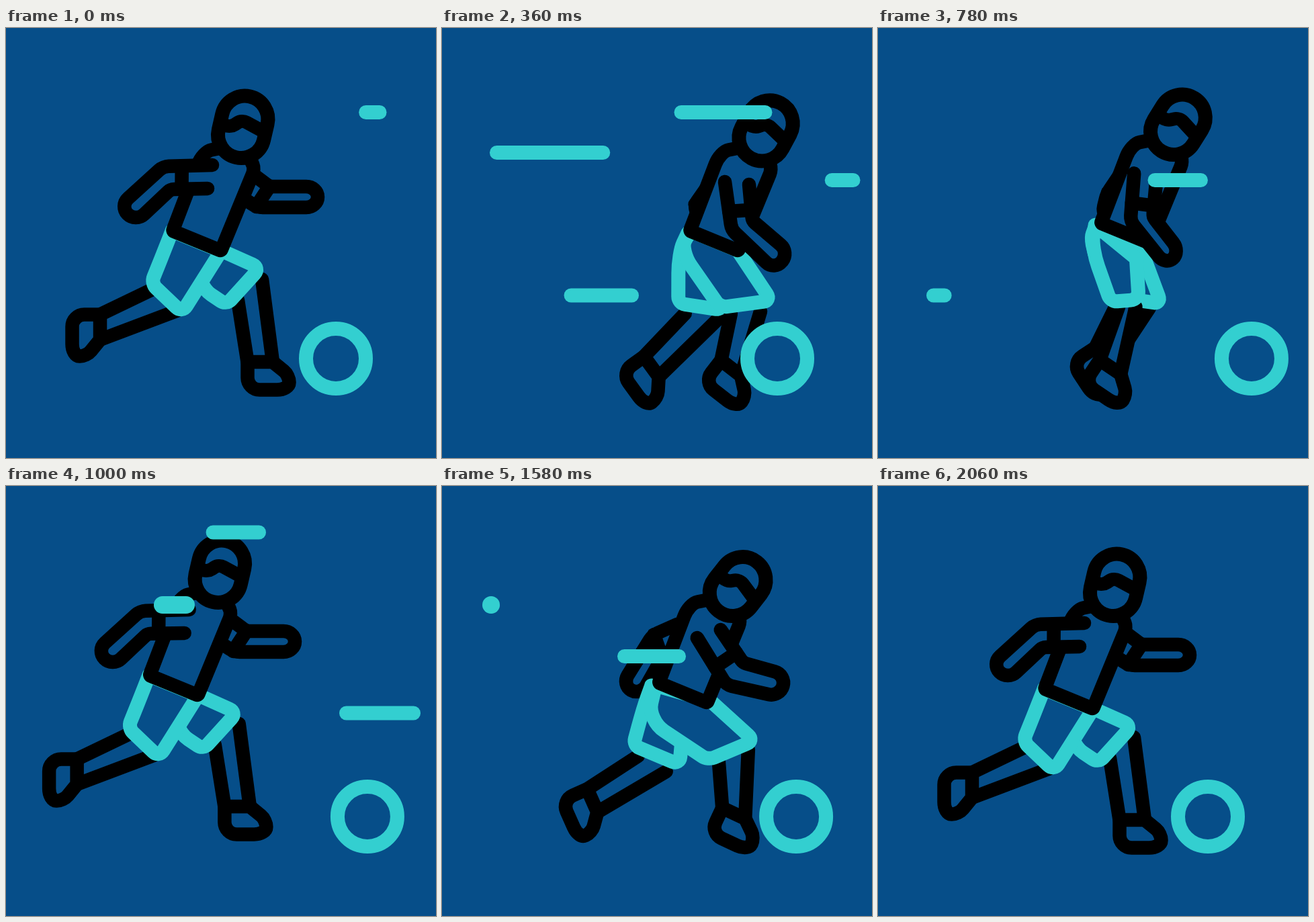
An HTML page with a canvas for the animation above (2400 ms loop, 640 by 640 pixels).

```html
<!DOCTYPE html>
<html lang="en">
<head>
<meta charset="utf-8">
<title>Running footballer</title>
<style>
  html, body { margin: 0; width: 100%; height: 100%; overflow: hidden; background: #064e89; }
  canvas { display: block; width: 100vw; height: 100vh; }
</style>
</head>
<body>
<canvas id="stage" width="640" height="640"></canvas>
<script>
const ctx = document.getElementById('stage').getContext('2d');
const LOOP = 2400, BG = '#064e89', TEAL = '#33cfd0', INK = '#000';

// Points as x,y runs; head and shoes are x, y, angle in degrees.
const stretch = {
  hip: [0, 0], head: [350, 159, 13],
  arm: [307, 204, 234, 206, 169, 265, 193, 289, 245, 240, 300, 239],
  farArm: [340, 245, 374, 267, 464, 267, 464, 236, 392, 236, 360, 212],
  shorts: [247, 302, 235, 333, 216, 380, 262, 424, 320, 332],
  hems: [220, 388, 254, 421], shoe: [140, 445, 90],
  farShorts: [290, 318, 283, 382, 328, 412, 378, 357, 322, 332],
  farHems: [345, 405, 381, 374], farShoe: [378, 497, 0]
};
const pass = {
  hip: [113, -19], head: [469.5, 147, 32],
  arm: [409, 205, 395, 280, 432, 354, 461, 336, 431, 278, 442, 222],
  farArm: [400, 200, 373, 245, 385, 275, 415, 272, 405, 245, 425, 205],
  shorts: [354, 287, 345, 311, 387, 396, 461, 402, 430, 325],
  hems: [397, 400, 443, 408], shoe: [380, 489, 50],
  farShorts: [352, 285, 347, 315, 364, 401, 395, 402, 410, 340],
  farHems: [373, 410, 392, 412], farShoe: [344, 501, 40]
};
const step = {
  hip: [121, 0], head: [476.5, 163.5, 28],
  arm: [421, 229, 431, 300, 495, 361, 517, 334, 462, 287, 457, 233],
  farArm: [410, 215, 375, 265, 392, 298, 424, 290, 410, 262, 430, 220],
  shorts: [370, 302, 354, 330, 414, 416, 490, 406, 440, 331],
  hems: [430, 425, 474, 422], shoe: [430, 506, 38],
  farShorts: [366, 305, 352, 335, 352, 410, 418, 420, 430, 340],
  farHems: [362, 425, 411, 433], farShoe: [312, 504, 54]
};
const lunge = {
  hip: [48, -8], head: [403, 156, 32],
  arm: [355, 229, 401, 290, 486, 304, 492, 270, 422, 257, 388, 214],
  farArm: [325, 200, 285, 216, 233, 284, 259, 304, 301, 248, 330, 228],
  shorts: [290, 298, 281, 348, 375, 407, 443, 375, 372, 320],
  hems: [393, 405, 434, 392], shoe: [418, 484, 22],
  farShorts: [282, 298, 272, 325, 254, 383, 321, 415, 325, 370],
  farHems: [258, 402, 304, 422], farShoe: [188, 461, 70]
};
const lungeLow = {
  hip: [75, -9], head: [433, 159, 38],
  arm: [380, 226, 423, 296, 503, 314, 512, 281, 448, 263, 415, 214],
  farArm: [350, 206, 314, 222, 268, 296, 296, 312, 328, 256, 355, 232],
  shorts: [318, 297, 306, 348, 396, 408, 465, 379, 400, 320],
  hems: [412, 410, 456, 392], shoe: [434, 487, 25],
  farShorts: [312, 297, 300, 330, 285, 386, 354, 415, 358, 370],
  farHems: [292, 402, 334, 425], farShoe: [224, 468, 66]
};
const passBack = {
  ...pass,
  shorts: pass.farShorts, hems: pass.farHems, shoe: pass.farShoe,
  farShorts: pass.shorts, farHems: pass.hems, farShoe: pass.shoe
};

const keys = [
  [0, stretch, 0, 0], [230, pass, 12, 21], [360, step, 0, 0], [560, lunge, 0, 0],
  [650, lunge, -24, -2], [820, passBack, -20, 7], [1000, stretch, -34, -20],
  [1040, stretch, -43, -21], [1280, pass, 0, 0], [1400, step, -2, -8],
  [1580, lungeLow, 0, 0], [1660, lungeLow, -24, 0], [1840, passBack, -5, 20],
  [2030, stretch, 0, 0]
].map(([t, pose, dx, dy]) => [t, shift(pose, dx, dy)]);

const ballKeys = [[0, 491], [360, 499], [560, 537], [770, 556], [1000, 538],
  [1280, 508], [1340, 505], [1580, 527], [1700, 540], [2060, 491]];

// start time, right end, y, length, thickness
const streaks = [
  [-86, 556, 125.5, 200, 21], [15, 258, 185.5, 200, 21], [250, 612, 226.5, 200, 21],
  [155, 282.5, 398, 200, 21], [828, 376.5, 69, 200, 21], [882, 268, 177, 195, 26],
  [781, 606.5, 338, 200, 21], [1069, 471.5, 253.5, 200, 21]
];

function shift(pose, dx, dy) {
  const out = {};
  for (const part in pose) {
    const p = pose[part];
    out[part] = p.map((v, i) => p.length === 3 && i === 2 ? v : v + (i % 2 ? dy : dx));
  }
  return out;
}

// Monotone cubic through keyed values: eases at every turning point.
function track(list, t, get) {
  const last = list.length - 1;
  if (t >= list[last][0]) return get(list[last][1]);
  let i = 0;
  while (list[i + 1][0] <= t) i++;
  const rate = k => k < 0 || k >= last ? 0
    : (get(list[k + 1][1]) - get(list[k][1])) / (list[k + 1][0] - list[k][0]);
  const slope = k => {
    const a = rate(k - 1), b = rate(k);
    return a * b <= 0 ? 0 : 2 * a * b / (a + b);
  };
  const h = list[i + 1][0] - list[i][0], u = (t - list[i][0]) / h, w = 1 - u;
  return get(list[i][1]) * w * w * (1 + 2 * u) + get(list[i + 1][1]) * u * u * (3 - 2 * u)
    + h * u * w * (slope(i) * w - slope(i + 1) * u);
}

function poseAt(t) {
  const pose = {};
  for (const part in stretch) {
    pose[part] = stretch[part].map((_, i) => track(keys, t, p => p[part][i]));
  }
  return pose;
}

const pairs = a => Array.from({ length: a.length / 2 }, (_, i) => [a[2 * i], a[2 * i + 1]]);
const mix = (a, b, k) => [a[0] + (b[0] - a[0]) * k, a[1] + (b[1] - a[1]) * k];

// Polyline with corners softened by the given cut lengths.
function outline(pts, cuts, closed) {
  const path = new Path2D(), n = pts.length;
  pts.forEach((p, i) => {
    if (!closed && (i === 0 || i === n - 1)) {
      i ? path.lineTo(...p) : path.moveTo(...p);
      return;
    }
    const toward = q => {
      const d = Math.hypot(q[0] - p[0], q[1] - p[1]) || 1;
      return mix(p, q, Math.min(cuts[i] / d, 0.5));
    };
    const a = toward(pts[(i + n - 1) % n]), b = toward(pts[(i + 1) % n]);
    i ? path.lineTo(...a) : path.moveTo(...a);
    path.bezierCurveTo(...mix(a, p, 0.55), ...mix(b, p, 0.55), ...b);
  });
  if (closed) path.closePath();
  return path;
}

function paint(path, color, width = 20.5, filled = true) {
  if (filled) {
    ctx.fillStyle = BG;
    ctx.fill(path);
  }
  ctx.strokeStyle = color;
  ctx.lineWidth = width;
  ctx.stroke(path);
}

function line(a, b, color, width) {
  paint(outline([a, b], [0, 0]), color, width, false);
}

function drawArm(data, outer, inner) {
  const p = pairs(data);
  paint(outline(p, [0, 8, 17, 17, 5, 0]), INK);
  line(mix(p[1], p[0], outer), mix(p[4], p[5], inner), INK);
}

function drawLeg(hems, [x, y, deg], shorts) {
  const c = Math.cos(deg * Math.PI / 180), s = Math.sin(deg * Math.PI / 180);
  const shoe = [[-18.5, 0], [19, 0], [43.5, 20], [43.5, 41.5], [-18.5, 41.5]]
    .map(([u, v]) => [x + u * c - v * s, y + u * s + v * c]);
  const [back, front] = pairs(hems);
  ctx.fillStyle = BG;
  ctx.fill(outline([back, shoe[0], shoe[1], front], [0, 0, 0, 0], true));
  line(back, shoe[0], INK);
  line(front, shoe[1], INK);
  paint(outline(shoe, [2, 2, 10, 18, 18], true), INK);
  paint(outline(pairs(shorts), [0, 30, 10, 12, 0], true), TEAL, 21);
}

function drawTorso([x, y]) {
  const p = [[318, 179], [293, 184], [248, 302], [320, 331.5], [370, 210], [365, 198]];
  paint(outline(p.map(q => [q[0] + x, q[1] + y]), [0, 20, 2, 2, 8, 0]), INK);
}

function drawHead([x, y, deg]) {
  const skull = new Path2D();
  skull.arc(0, 0, 34.5, 0, Math.PI);
  skull.arc(0, -24, 34.5, Math.PI, 0);
  skull.closePath();
  ctx.save();
  ctx.translate(x, y);
  ctx.rotate(deg * Math.PI / 180);
  paint(skull, INK, 21);
  paint(outline([[-33, -10], [-18, -7], [-4, -22], [32, -12]], [0, 8, 8, 0]), INK, 20, false);
  ctx.restore();
}

function drawStreaks(t) {
  const ease = p => {
    const u = Math.min(Math.max(p, 0), 1);
    return u * u * (3 - 2 * u);
  };
  for (const [start, x, y, len, width] of streaks) {
    const p = (t - start) / 440, lag = p - 0.6;
    if (p > 0 && lag < 1) line([x - len * ease(p), y], [x - len * ease(lag), y], TEAL, width);
  }
}

function draw(t) {
  const p = poseAt(t);
  ctx.lineCap = ctx.lineJoin = 'round';
  ctx.fillStyle = BG;
  ctx.fillRect(0, 0, 640, 640);
  drawArm(p.farArm, 0.05, 0);
  drawLeg(p.farHems, p.farShoe, p.farShorts);
  drawLeg(p.hems, p.shoe, p.shorts);
  drawTorso(p.hip);
  drawArm(p.arm, 0.38, 0.3);
  drawHead(p.head);

  const ball = new Path2D();
  ball.arc(track(ballKeys, t, v => v), 492, 44.5, 0, 2 * Math.PI);
  paint(ball, TEAL, 21);
  drawStreaks(t);
}

const began = performance.now();
function frame() {
  draw((performance.now() - began) % LOOP);
  requestAnimationFrame(frame);
}
frame();
</script>
</body>
</html>
```
